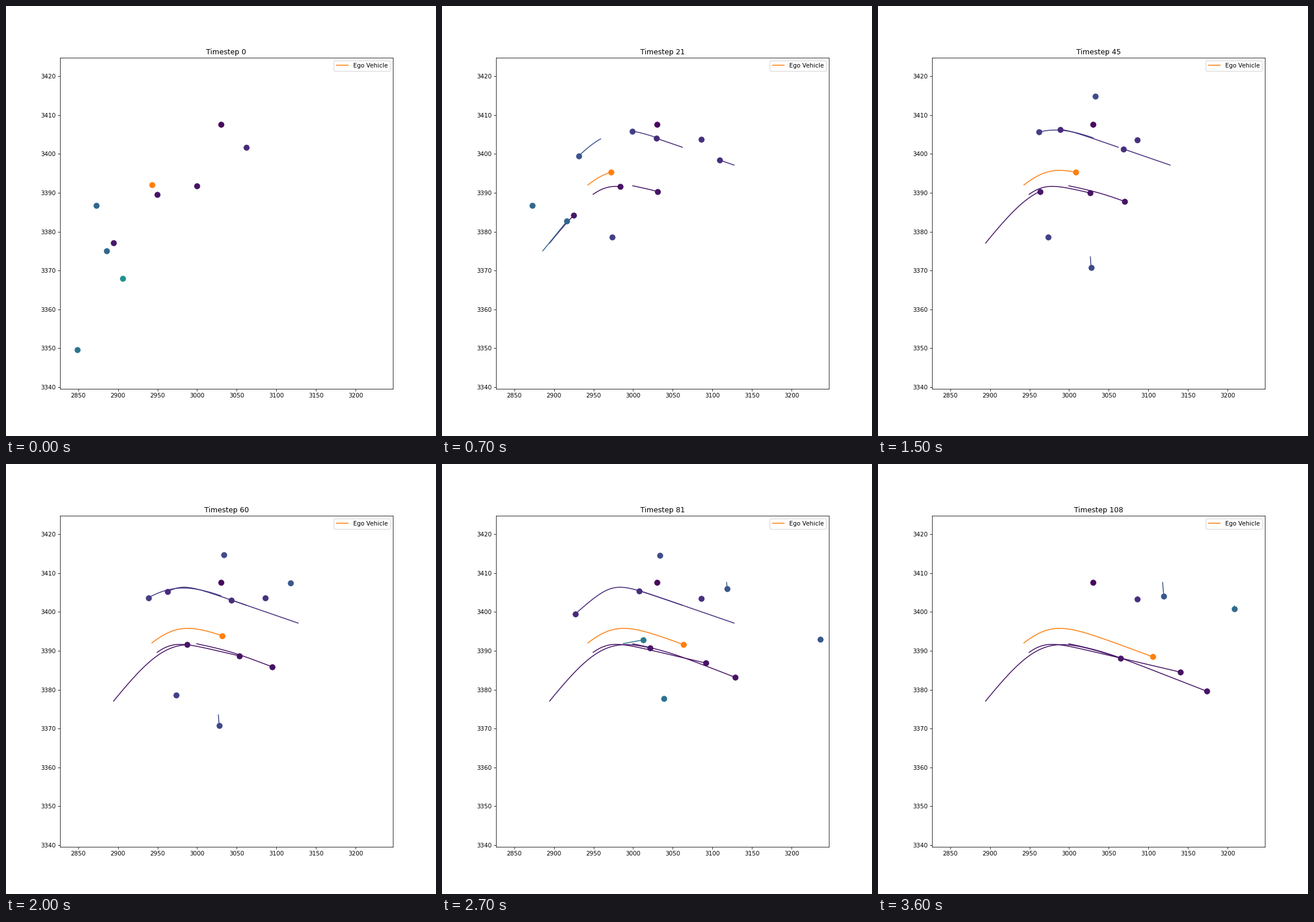
A matplotlib script that plays this animation: 748 px wide and 748 px high, repeating every 3.7 s.

```python
import numpy as np
import matplotlib.pyplot as plt
from matplotlib.animation import FuncAnimation

FRAMES, INTERVAL, STRIDE = 37, 100, 3
LAST = (FRAMES - 1) * STRIDE
EGO = "tab:orange"

fig, ax = plt.subplots(figsize=(10, 10), dpi=74.8)
ax.set_xlim(2826.55, 3247.45)
ax.set_ylim(3339.55, 3424.83)
title = ax.set_title("Timestep 0")
ax.plot([], [], color=EGO, label="Ego Vehicle")
ax.legend(loc="upper right")

to_data = ax.transData.inverted()


def to_axes(x, y):
    """Stage pixels (y down, whole numbers at pixel centres) to data units."""
    return to_data.transform(np.column_stack([x - 0.6, fig.bbox.height - y + 0.6]))


def bend(cx, cy, width, left, right):
    """Lane whose slope eases from left to right around the point (cx, cy)."""
    def lane(x):
        u = (x - cx) / width
        return cy + width * ((left + right) / 2 * u
                             + (right - left) / 2 * np.log(np.cosh(u)))
    return lane


def drive(lane, x0, speed, lag=0):
    """Follow a lane at constant speed; lag is the time lost in pulling away."""
    def path(age):
        x = x0 + speed * (age - lag * (1 - np.exp(-age / 10)))
        return x, lane(x)
    return path


def straight(x0, y0, vx=0, vy=0, stop=LAST):
    """Move in a line, then stand still from age stop on."""
    def path(age):
        t = np.minimum(age, stop)
        return x0 + vx * t, y0 + vy * t
    return path


class Track:
    """Road user seen from timestep start to end."""

    def __init__(self, shade, start, end, path):
        color = EGO if shade is None else plt.cm.viridis(shade)
        self.start, self.end = start, end
        self.path = to_axes(*path(np.arange(end - start + 1.0)))
        self.trail, = ax.plot([], [], color=color, lw=1.5, zorder=2)
        self.dot, = ax.plot([], [], "o", color=color, ms=9, zorder=3)

    def show(self, step):
        seen = self.start <= step <= self.end
        past = self.path[:step - self.start + 1] if seen else self.path[:0]
        self.trail.set_data(past[:, 0], past[:, 1])
        self.dot.set_data(past[-1:, 0], past[-1:, 1])


westbound = bend(296, 216.9, 30, -0.9, 0.345)
PULL = 2.4

tracks = [
    # eastbound traffic
    Track(0.05, 0, LAST, drive(bend(281.5, 318.3, 31, -1, 0.235), 263.5, 2.49, PULL)),
    Track(0.05, 0, LAST, drive(bend(390, 327.3, 40, 0.2, 0.39), 332.5, 2.27, PULL)),
    Track(0.06, 0, LAST, drive(bend(281, 323.8, 60, -1.3, 0.34), 187.8, 2.22, PULL)),
    Track(0.33, 0, 26, straight(176, 426.5, 2, -2.46)),
    Track(0.40, 65, 84, straight(316, 313, 2.15, -0.4)),
    Track(0.42, 88, 104, straight(373, 318.5, 2, -0.22)),
    # westbound traffic
    Track(0.12, 0, 83, drive(westbound, 418.5, -2.37, PULL)),
    Track(0.13, 10, 105, drive(westbound, 508.7, -2.32)),
    Track(0.18, 1, 73, drive(bend(279, 220.4, 75, -1, 0.45), 374.5, -2.14)),
    Track(0.26, 1, 42, drive(bend(277, 231.5, 41, -1.1, 0), 276.5, -1.9)),
    Track(0.50, 3, 13, straight(123.5, 463.5, -1.65, 3.05)),
    Track(0.42, 88, 103, straight(333.5, 214, -1.9, -0.54)),
    # slow movers
    Track(0.39, 0, 19, straight(125, 598.8, -0.17, -1.48)),
    Track(0.50, 0, 14, straight(203.8, 474.8, -0.07, 0.12)),
    Track(0.22, 32, 80, straight(370, 437, 0.1, 1.4, stop=13)),
    Track(0.27, 58, LAST, straight(495.7, 206.7, 0.04, 0.47)),
    Track(0.23, 38, 85, straight(378.5, 157, 0.03, 0.06)),
    Track(0.14, 18, LAST, straight(452, 232.8, 0, 0.027)),
    Track(0.34, 83, LAST, straight(621, 248, 0, 0.17)),
    # parked
    Track(0.02, 0, LAST, straight(375, 206.3)),
    Track(0.33, 0, 27, straight(157.2, 347.5)),
    Track(0.19, 3, 65, straight(296.5, 403)),
    Track(0.38, 61, 82, straight(387, 408.6)),
    Track(0.27, 65, 105, straight(658.6, 305.5)),
    # ego vehicle
    Track(None, 0, LAST, drive(bend(293, 290.1, 48, -1, 0.37), 254.4, 2.12, PULL)),
]


def update(frame):
    step = frame * STRIDE
    title.set_text(f"Timestep {step}")
    for track in tracks:
        track.show(step)


anim = FuncAnimation(fig, update, frames=FRAMES, interval=INTERVAL,
                     init_func=lambda: update(0), repeat=True, repeat_delay=0)
plt.show()
```
